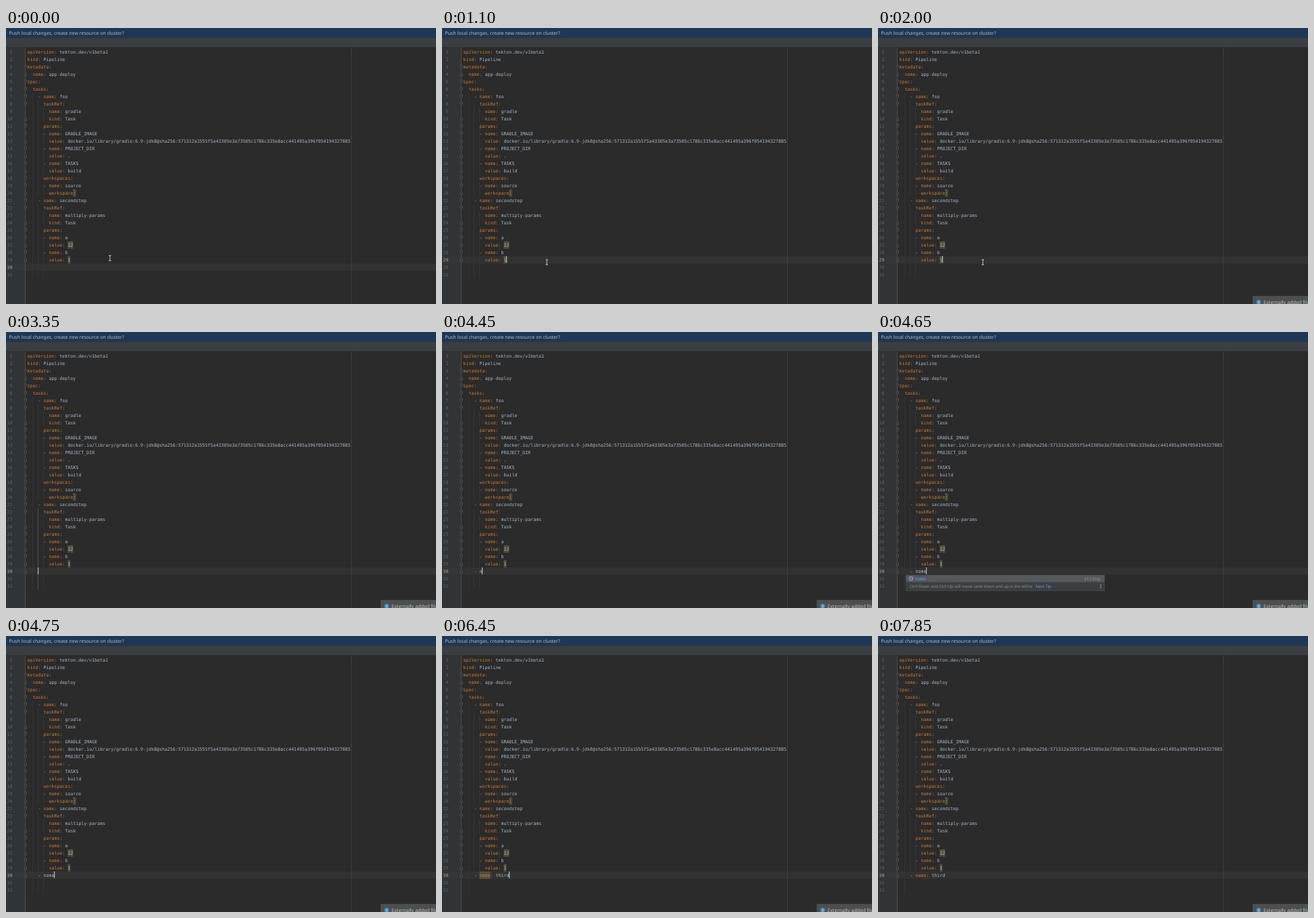
Write an HTML page that moves like this. It is 637 px wide and 409 px high and loops after 8000 ms.

```html
<!DOCTYPE html>
<html lang="en">
<head>
<meta charset="utf-8">
<title>YAML editor</title>
<style>
html, body { margin: 0; width: 100%; height: 100%; overflow: hidden; background: #2b2b2b; }
svg { display: block; width: 637px; height: 409px; }
text { white-space: pre; text-rendering: geometricPrecision; font: 6.645px 'DejaVu Sans Mono', monospace; }
.ui { font-family: 'Noto Sans', 'Open Sans', sans-serif; }
</style>
</head>
<body>
<svg id="stage" viewBox="0 0 637 409"></svg>
<script>
const LOOP = 8000, LEFT = 31.5, CHAR = 4, ROW = 11;
const KEY = '#cc7832', PLAIN = '#a9b7c6', WARN = '#52503a', DIM = '#606366', LINK = '#589df6';
const code = `apiVersion: tekton.dev/v1beta1
kind: Pipeline
metadata:
  name: app-deploy
spec:
  tasks:
    - name: foo
      taskRef:
        name: gradle
        kind: Task
      params:
      - name: GRADLE_IMAGE
        value: docker.io/library/gradle:6.9-jdk8@sha256:571312a1555f5a43305e3a73505c1786c335e8acc441495a396f054194327885
      - name: PROJECT_DIR
        value: .
      - name: TASKS
        value: build
      workspaces:
      - name: source
        workspace:
    - name: secondstep
      taskRef:
        name: multiply-params
        kind: Task
      params:
      - name: a
        value: 12
      - name: b
        value: 1`.split('\n');
const typed = '- name: third';
const keyTimes = [4050, 4200, 4450, 4550, 4600, 4650, 5400, 5700, 5900, 6000, 6200, 6300, 6450];
const foldStarts = [3, 5, 6, 7, 8, 11, 12, 14, 16, 18, 19, 21, 22, 25, 26, 28];
const unfolded = [1, 2, 9, 23];

const rowY = row => 30 + ROW * (row - 1);
const colX = col => LEFT + CHAR * col;
const rect = (x, y, w, h, fill, more = '') =>
  `<rect x="${x}" y="${y}" width="${w}" height="${h}" fill="${fill}" ${more}/>`;
const text = (x, y, fill, s, more = '') => `<text x="${x}" y="${y}" fill="${fill}" ${more}>${s}</text>`;
const ui = (x, y, size, fill, s) => text(x, y, fill, s, `class="ui" style="font-size:${size}px"`);
const span = (fill, s) => `<tspan fill="${fill}">${s}</tspan>`;
const mark = (row, col, n) => rect(colX(col), rowY(row), n * CHAR, ROW, WARN);

function codeLine(row, line) {
  const body = line.trimStart(), x = colX(line.length - body.length), y = rowY(row) + 8;
  const [, dash = '', key = '', value] = body.match(/^(- ?)?([^:]*:)?(.*)$/);
  return text(x, y, PLAIN, dash + span(KEY, key) + value);
}

function fold(row) {
  const y = rowY(row) + 3, start = foldStarts.includes(row);
  const shape = start
    ? `M27 ${y}h3.6v3l-1.8 2l-1.8-2z`
    : `M27 ${y + 5}h3.6v-3l-1.8-2l-1.8 2z`;
  const bar = `M27.9 ${y + (start ? 2 : 3)}h1.8`;
  return `<path d="${shape}${bar}" fill="#2b2b2b" stroke="${DIM}" stroke-width=".6"/>`;
}

function guides(last, t, caretCol) {
  const end = t < 5100 ? last : 29;
  const runs = [[2, 7, last], [4, 8, 20], [4, 22, end], [6, 9, 10], [6, 12, 17], [6, 19, 20], [6, 23, 24], [6, 26, end]];
  return runs.map(([col, a, b]) => {
    const active = t >= 2050 && t < 4050 && col === caretCol && b === last;
    return rect(31 + CHAR * col, rowY(a), 1, (b - a + 1) * ROW, active ? '#505050' : '#353535');
  }).join('');
}

function popup(word) {
  const full = word.length < 3, n = word.length, h = full ? 34 : 24;
  const foot = 360 + h - 13;
  let s = rect(41, 360, 295, h, '#46484a') + rect(41.5, 360.5, 294, 10, '#54595d') +
    rect(41.5, foot, 294, 12.5, '#3c3f41') +
    '<circle cx="49" cy="365.4" r="3.4" fill="#8d86a8"/>' +
    text(49, 367.2, '#333', 'p', 'text-anchor="middle" style="font-size:5.5px"') +
    text(55, 368, '#bbb', span(LINK, 'name'.slice(0, n)) + 'name'.slice(n)) +
    text(329, 368, '#999', 'string', 'text-anchor="end"');
  if (full) {
    s += text(45, 378, '#bbb', '[]') +
      text(55, 378, '#bbb', 'ru' + span(LINK, 'n') + (n > 1 ? span(LINK, 'A') : 'A') + 'fter') +
      text(329, 378, '#999', 'array', 'text-anchor="end"');
  }
  s += ui(47, foot + 8, 5.97, '#8c8c8c', 'Ctrl+Down and Ctrl+Up will move caret down and up in the editor') +
    ui(233.5, foot + 8, 5.97, LINK, 'Next Tip');
  for (let i = 0; i < 3; i++) s += rect(329.5, foot + 3 + i * 2.2, 1.2, 1.2, '#bbb');
  return s;
}

function scene(t) {
  const count = keyTimes.filter(k => t >= k).length;
  const line = typed.slice(0, count);
  const last = t < 2250 ? 31 : 32;
  const gutterRow = t >= 950 && t < 2250 ? 29 : 30;
  const textRow = t >= 1100 && t < 2050 ? 29 : 30;
  const caretCol = t < 1100 ? 0 : t < 2050 ? 16 : t < 2750 ? 8 : t < 3350 ? 6 : 4 + count;

  let s = rect(0, 0, 637, 409, '#2b2b2b') + rect(0, 29, 28, 380, '#313335') +
    rect(0, rowY(gutterRow), 28, ROW, '#353637') + rect(29, rowY(textRow), 608, ROW, '#323232') +
    guides(last, t, caretCol) +
    rect(28, 29, 1, 380, '#4b4c4d') + rect(511, 29, 1, 380, '#404040') +
    rect(0, 0, 637, 14, '#1d3757') + rect(0, 14, 637, 15, '#3c3f41') + rect(0, 14, 637, 1, '#323435') +
    rect(0, 28, 637, 1, '#323232') +
    ui(4.5, 10, 7.03, '#bbbcbd', 'Push local changes, create new resource on cluster?');

  s += mark(20, 17, 1) + mark(27, 15, 2) + mark(29, 15, 1);
  if (t >= 5100 && t < 6850) s += mark(30, 6, 4);

  for (let row = 1; row <= last; row++) {
    s += text(9.5, rowY(row) + 8, row === gutterRow ? '#a4a3a3' : DIM, row, 'text-anchor="end"');
    const folded = row < 29 ? !unfolded.includes(row)
      : row === 29 ? t < 2600 || t >= 3100
      : row === 30 && t >= 2600;
    if (folded) s += fold(row);
  }
  code.forEach((l, i) => s += codeLine(i + 1, l));
  if (line) s += codeLine(30, '    ' + line);
  if (t >= 950 && t < 7850) s += rect(31 + CHAR * caretCol, rowY(textRow), 1.2, 10, '#bbbbbb');

  if (t >= 4500 && t < 4750) s += popup(line.slice(2));
  if (t >= 2000) {
    s += rect(555, 397, 90, 20, '#4c4f51', 'rx="1.5"') +
      '<circle cx="564" cy="406.2" r="3.4" fill="#3a8fc4"/>' +
      rect(563.5, 405.6, 1, 2.6, '#e8eef2') + rect(563.5, 404, 1, 1, '#e8eef2') +
      ui(571, 409.2, 7.2, '#bbbbbb', 'Externally added files');
  }
  if (t < 2350) {
    const [x, y] = t < 550 ? [154, 341] : t < 600 ? [154.5, 344] : [155.3, 347];
    const beam = `M${x - 1.8} ${y - 3.8}h3.6M${x} ${y - 3.8}v7.6M${x - 1.8} ${y + 3.8}h3.6`;
    s += `<path d="${beam}" fill="none" stroke="#111" stroke-width="1.8"/>` +
      `<path d="${beam}" fill="none" stroke="#ddd" stroke-width="1"/>`;
  }
  return s;
}

const stage = document.getElementById('stage');
const began = performance.now();
let shown = '';
function tick() {
  const next = scene((performance.now() - began) % LOOP);
  if (next !== shown) stage.innerHTML = shown = next;
  requestAnimationFrame(tick);
}
tick();
</script>
</body>
</html>
```
